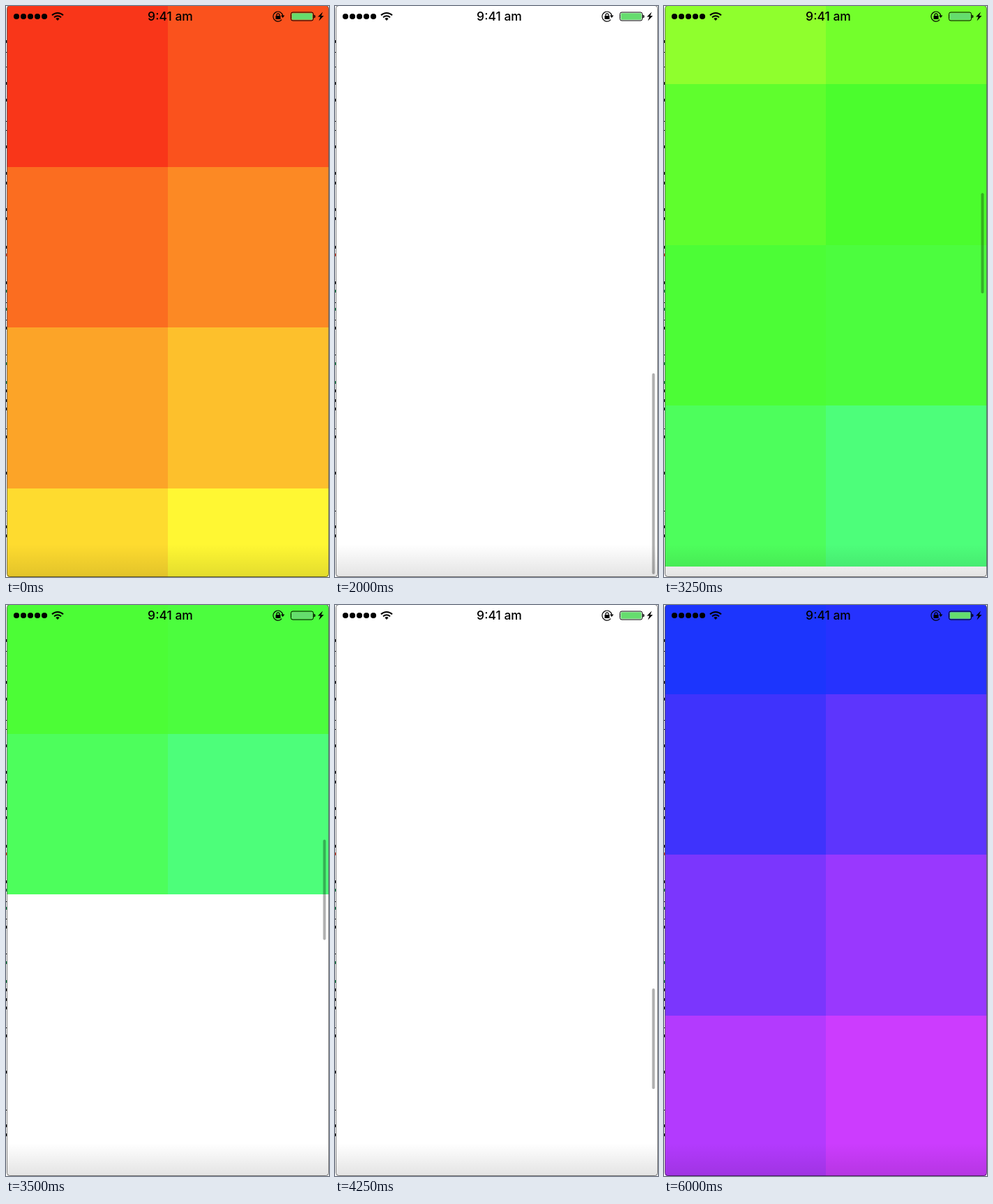
An HTML page that plays this animation: 463x819 px, repeating every 6250 ms.

```html
<!DOCTYPE html>
<html lang="en">
<head>
<meta charset="utf-8">
<title>Endless colour grid</title>
<style>
  html, body { margin: 0; width: 100%; height: 100%; overflow: hidden; background: #fff; }
  svg { display: block; width: 463px; height: 819px; }
  text { font: 500 17.5px Inter, Roboto, sans-serif; }
</style>
</head>
<body>
<svg viewBox="0 0 463 819">
  <defs>
    <linearGradient id="shade" x2="0" y2="1">
      <stop offset="0" stop-opacity="0"/>
      <stop offset="1" stop-opacity=".11"/>
    </linearGradient>
    <clipPath id="screen"><rect x="1.5" width="461" height="819" rx="4"/></clipPath>
  </defs>
  <g id="edge"></g>
  <g clip-path="url(#screen)">
    <rect width="463" height="819" fill="#fff"/>
    <g id="grid" shape-rendering="crispEdges"></g>
    <rect y="772" width="463" height="47" fill="url(#shade)"/>
    <rect id="bar" x="454.5" width="4" rx="2" fill-opacity=".31"/>
  </g>
  <rect x="1.5" y="-.5" width="461" height="819" rx="4" fill="none" stroke="#000" stroke-opacity=".5"/>

  <g id="dots"></g>
  <g fill="none" stroke="#000" stroke-width="2">
    <path d="M66 13.3a11.3 11.3 0 0 1 16 0M69 16.4a7 7 0 0 1 10 0"/>
    <path d="M74 21l-2.6-2.7a3.7 3.7 0 0 1 5.2 0z" fill="#000" stroke="none"/>
    <path d="M395.2 19.6a7 7 0 1 1 1.6-5.6" stroke-width="1.2"/>
    <path d="M388 14.5v-1.6a2 2 0 0 1 4 0v1.6" stroke-width="1.2"/>
  </g>
  <path d="M386.5 14h7v5h-7zM394 13.5h5.4l-2.7 3.4zM454 8.5l-7 7h3.6l-2.1 6 7-7.5h-3.6z"/>
  <rect x="408.5" y="9" width="32" height="12" rx="2.5" fill="none" stroke="#000"/>
  <rect x="409.7" y="10.2" width="29.6" height="9.6" rx="1.3" fill="#65dc6e"/>
  <path d="M441.5 12.5q2 .3 2 2.5t-2 2.5z"/>
  <text x="235.5" y="21" text-anchor="middle">9:41 am</text>
</svg>
<script>
const $ = id => document.getElementById(id);
const CELL = 230.5, VIEW = 819, PAGE = 10 * CELL, TICK = 250, TICKS = 25;

function add(parent, tag, attrs) {
  const el = document.createElementNS("http://www.w3.org/2000/svg", tag);
  for (const key in attrs) el.setAttribute(key, attrs[key]);
  return $(parent).appendChild(el);
}

// [cell index, r, g, b]; the cells between are blended
const stops = [
  [0, 249, 54, 25], [7, 255, 247, 51], [8, 247, 253, 50], [12, 143, 255, 45],
  [13, 115, 255, 44], [15, 75, 253, 45], [17, 76, 253, 62], [19, 77, 254, 122],
  [24, 79, 250, 253], [32, 28, 53, 253], [33, 38, 50, 254], [34, 63, 51, 252],
  [37, 153, 56, 254], [39, 204, 60, 254]
];
function cellColor(i) {
  const k = Math.max(1, stops.findIndex(s => s[0] >= i));
  const a = stops[k - 1], b = stops[k], f = (i - a[0]) / (b[0] - a[0]);
  return `rgb(${[1, 2, 3].map(c => Math.round(a[c] + (b[c] - a[c]) * f))})`;
}

const cells = Array.from({ length: 40 }, (_, i) => add("grid", "rect", {
  x: i % 2 ? 232 : 1, y: (i >> 1) * CELL, width: 231, height: CELL, fill: cellColor(i)
}));

for (let i = 0; i < 5; i++) add("dots", "circle", { cx: 15 + i * 10, cy: 15, r: 4.1 });

// Slivers of the window behind
const slivers = (ys, fill) => ys.forEach(y => add("edge", "rect", { y: y - 2, width: 1.5, height: 4, fill }));
slivers([51, 111, 135, 202, 240, 254, 292, 305, 346, 397, 462, 552, 566, 578, 618, 670, 747, 760], "#111");
slivers([357], "#d33a20");
slivers([409, 435, 513, 540], "#0a7a3c");
[66, 87, 165, 178, 425, 450, 500, 606, 724].forEach(y => add("edge", "rect", { y, width: 1.5, height: 1 }));

// Scroll position per tick while moving; it rests at the page end otherwise
const end1 = PAGE - VIEW, end2 = 2 * PAGE - VIEW;
const moving = { 3: 731, 4: 1279, 13: 1501.5, 14: 1890, 15: 2129, 16: 2615, 17: 3104 };
const scrollAt = n => moving[n] ?? (n < 3 ? 0 : n < 13 ? end1 : end2);

function draw(now) {
  const n = Math.floor(now / TICK) % TICKS;
  const scroll = scrollAt(n);
  const loaded = n < 9 ? 8 : n < 22 ? 20 : 40;
  const height = n < 9 ? PAGE : 2 * PAGE;
  const track = VIEW - 8;

  $("grid").setAttribute("transform", `translate(0 ${-scroll})`);
  cells.forEach((cell, i) => cell.setAttribute("visibility", i < loaded ? "visible" : "hidden"));
  $("bar").setAttribute("y", 4 + scroll / height * track);
  $("bar").setAttribute("height", VIEW / height * track);
  $("bar").setAttribute("visibility", (n > 2 && n < 9) || (n > 12 && n < 22) ? "visible" : "hidden");
}

const start = performance.now();
function loop() {
  draw(performance.now() - start);
  requestAnimationFrame(loop);
}
loop();
</script>
</body>
</html>
```
